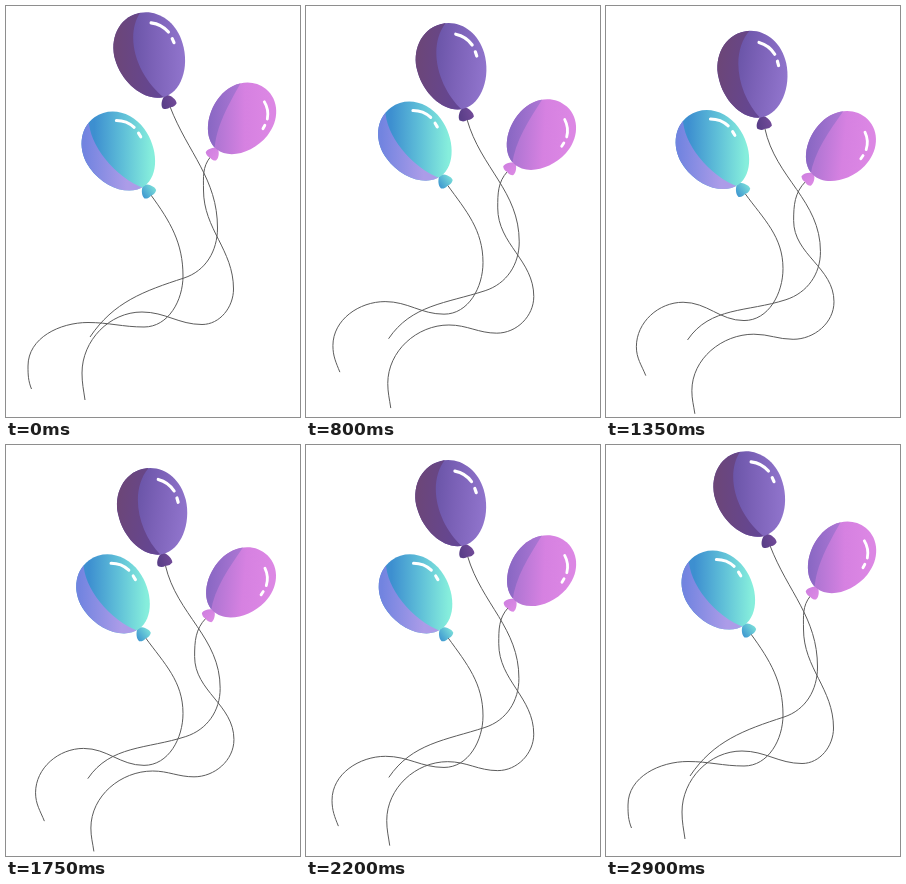
These frames come from a looping animation (294x411 px, 2.95 s). An HTML page:

```html
<!DOCTYPE html>
<html lang="en">
<head>
<meta charset="utf-8">
<title>Balloons</title>
<style>
  html, body { margin: 0; width: 100%; height: 100%; overflow: hidden; background: #fff; }
  svg { display: block; width: 100vw; height: 100vh; }
  .string { fill: none; stroke: #5c5c5c; stroke-width: 1; }
  .shine { fill: none; stroke: #fff; stroke-width: 3.2; stroke-linecap: round; }
</style>
</head>
<body>
<svg id="stage" viewBox="0 0 294 411"></svg>
<script>
const LOOP = 2950, STEP = 50, SWING = 2900;
const DOWN = 90, LEFT = 180;
const stage = document.getElementById('stage');

// move: how far a balloon or a turn of its string travels over one swing.
// A string starts at the knot and passes through turns with a given heading.
const turn = (x, y, heading, ...move) => ({ x, y, heading, move });

const balloons = [
  {
    id: 'violet', x: 144.2, y: 49, tilt: -21, move: [3, 19.3, 9], scale: 0.99, glint: 0,
    seam: 'M11 -47 C-20 -30 -20 18 -1 47',
    main: ['#6450a2', '#7c62b8', '#9074cc'], shade: ['#6c4678', '#644694'], knot: ['#573d86', '#714a98'],
    turns: [
      turn(211.5, 222, DOWN, 3, 24),
      turn(178, 272, 162, 2, 22),
      turn(84, 331, 124, -2.5, 3)
    ]
  },
  {
    id: 'pink', x: 235.3, y: 112.8, tilt: 39, move: [-1, 28.3, 6], scale: 0.88, glint: -8,
    seam: 'M-27 -36 C-22 -8 -18 24 -1 47',
    main: ['#b276d4', '#d681e1', '#dc87e4'], shade: ['#8a68c4', '#b67ad8'], knot: ['#cf7fe0', '#dc8ae4'],
    turns: [
      turn(197.5, 184, DOWN, -10, 31),
      turn(227.5, 283, DOWN, 0.5, 13),
      turn(196, 318.5, LEFT, -9, 15),
      turn(136, 306, LEFT, 12, 22.5),
      turn(76, 367, DOWN, 10, 18),
      turn(79, 394, 82, 10, 14)
    ]
  },
  {
    id: 'blue', x: 113.3, y: 145.5, tilt: -36, move: [-6, 0, 0], scale: 0.96, glint: 8, bobs: true,
    seam: 'M-5 -47 C-21 -28 -21 18 -1 47',
    main: ['#3d8fd0', '#5fbfd8', '#86eedc'], shade: ['#7284e0', '#ac9ce8'], knot: ['#3f98d0', '#78dcda'],
    turns: [
      turn(177, 270, DOWN, 0, -6),
      turn(138, 321, LEFT, 0, -5),
      turn(82, 316.5, LEFT, -5, -19),
      turn(22, 360, DOWN, 8.5, -18),
      turn(25.5, 383, 68, 14.5, -12)
    ]
  }
];

const EGG = 'M0 -44 C20 -44 35 -26 35 -4 C35 21 19 44.5 0 44.5 C-19 44.5 -35 21 -35 -4 C-35 -26 -20 -44 0 -44Z';
const KNOT = 'M-2 44 Q0 42 2 44 C5 46 8.5 51 7.5 55 Q4 58 0 56.5 Q-4 58 -7.5 55 C-8.5 51 -5 46 -2 44Z';
const KNOT_TIP = 56;

const ease = k => k * k * (3 - 2 * k);
const num = v => v.toFixed(2);
const rad = deg => deg * Math.PI / 180;

// Joins the turns with curves whose handles follow the headings.
function curve(turns) {
  const handle = (p, reach) =>
    [p.x + reach * Math.cos(rad(p.heading)), p.y + reach * Math.sin(rad(p.heading))].map(num);
  return turns.reduce((d, p, i) => {
    if (!i) return `M${handle(p, 0)}`;
    const last = turns[i - 1], reach = 0.38 * Math.hypot(p.x - last.x, p.y - last.y);
    return `${d}C${handle(last, reach)} ${handle(p, -reach)} ${handle(p, 0)}`;
  }, '');
}

function gradient(id, colors, box = '') {
  const stops = colors.map((c, i) =>
    `<stop offset="${i / (colors.length - 1)}" stop-color="${c}"/>`).join('');
  return `<linearGradient id="${id}" ${box}>${stops}</linearGradient>`;
}

// Gradient box that runs left to right on the stage despite the balloon's tilt.
function levelBox(tilt, from, to) {
  const x = Math.cos(rad(tilt)), y = -Math.sin(rad(tilt));
  return `gradientUnits="userSpaceOnUse" x1="${num(from * x)}" y1="${num(from * y)}" x2="${num(to * x)}" y2="${num(to * y)}"`;
}

function balloonMarkup({ id, seam, main, shade, knot, tilt, glint }) {
  return `
    <defs>
      ${gradient(id + 'Main', main, levelBox(tilt, -26, 34))}
      ${gradient(id + 'Shade', shade, levelBox(tilt, -36, 8))}
      ${gradient(id + 'Knot', knot)}
    </defs>
    <g id="${id}">
      <path d="${KNOT}" fill="url(#${id}Knot)"/>
      <path d="${EGG}" fill="url(#${id}Main)"/>
      <path d="${seam} L-50 47 V-47Z" fill="url(#${id}Shade)" clip-path="url(#egg)"/>
      <path class="shine" transform="rotate(${glint})" d="M12.5 -30 Q22 -25 25.5 -15 M26.7 -7.5 L26.9 -3"/>
    </g>`;
}

stage.innerHTML =
  `<defs><clipPath id="egg"><path d="${EGG}"/></clipPath></defs>` +
  balloons.map(b => `<path class="string" id="${b.id}String"/>`).join('') +
  balloons.map(balloonMarkup).join('');

for (const b of balloons) {
  b.body = document.getElementById(b.id);
  b.line = document.getElementById(b.id + 'String');
}

function draw(t) {
  const swing = ease(1 - Math.abs(1 - 2 * t / SWING));
  const wave = Math.sin(2 * Math.PI * t / SWING);
  const bob = -7 * wave - 3.2 * wave ** 4;

  for (const b of balloons) {
    const lift = b.bobs ? bob : 0;
    const moved = p => ({ ...p, x: p.x + p.move[0] * swing, y: p.y + p.move[1] * swing + lift });
    const { x, y } = moved(b);
    const tilt = b.tilt + b.move[2] * swing;
    const heading = DOWN + tilt, reach = KNOT_TIP * b.scale;
    const knot = {
      x: x + reach * Math.cos(rad(heading)),
      y: y + reach * Math.sin(rad(heading)),
      heading
    };
    b.body.setAttribute('transform',
      `translate(${num(x)} ${num(y)}) rotate(${num(tilt)}) scale(${b.scale})`);
    b.line.setAttribute('d', curve([knot, ...b.turns.map(moved)]));
  }
}

const start = performance.now();
function tick() {
  const t = (performance.now() - start) % LOOP;
  draw(Math.floor(t / STEP) * STEP);
  requestAnimationFrame(tick);
}
tick();
</script>
</body>
</html>
```
